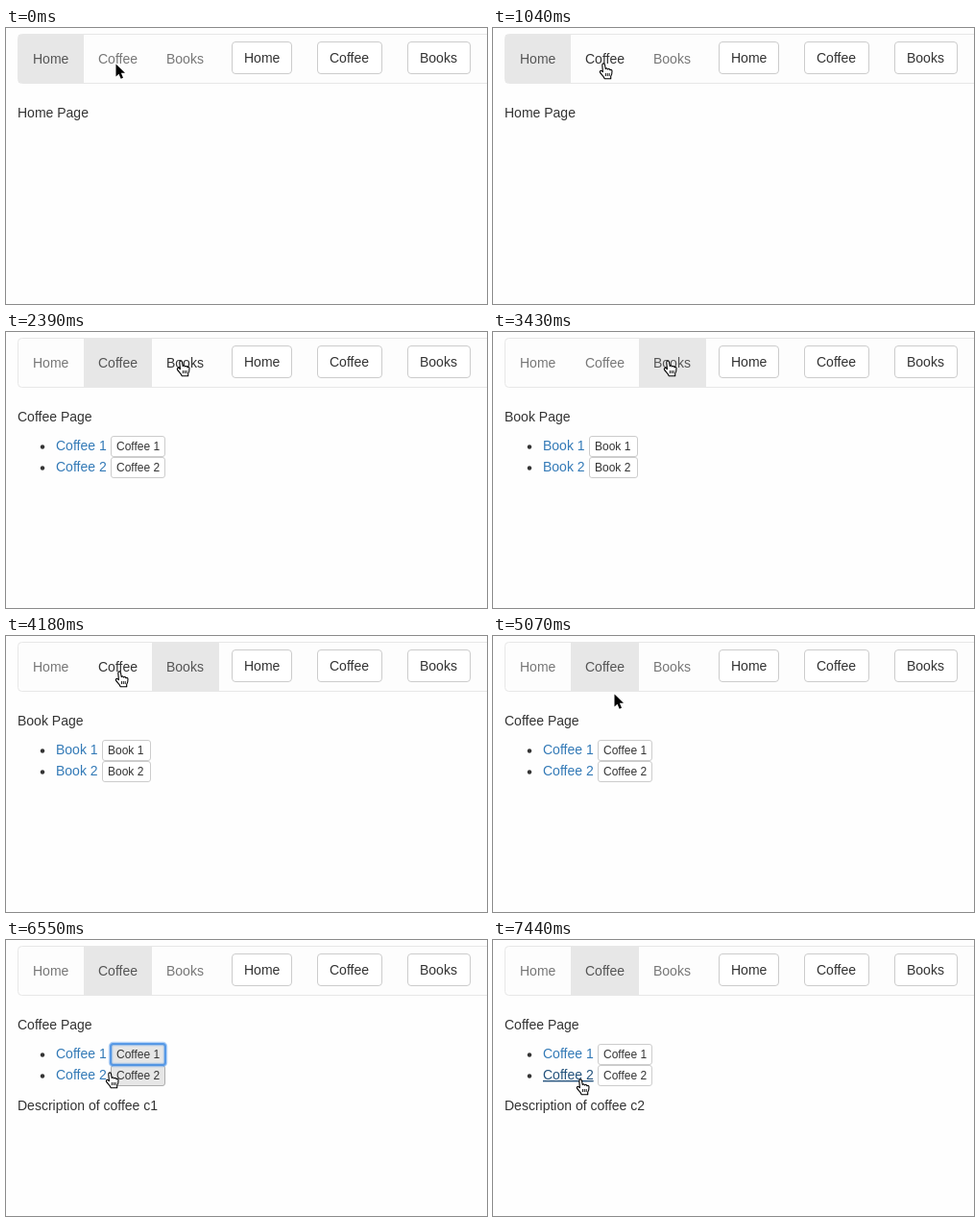
Animation, 501 px wide and 287 px high, one loop 8 s. Source, as an HTML page:

```html
<!DOCTYPE html>
<html lang="en">
<head>
<meta charset="utf-8">
<title>Coffee and books navigation</title>
<style>
  html, body { margin: 0; width: 100%; height: 100%; overflow: hidden; background: #fefefe; }
  svg { display: block; font: 14px "Liberation Sans", Arial, sans-serif; }
  text { white-space: pre; }
</style>
</head>
<body>
<svg id="stage" width="501" height="287" viewBox="0 0 501 287"></svg>
<script>
const LOOP = 8000;
const stage = document.getElementById("stage");

const tabs = [
  { name: "Home", x: 13, width: 68, buttonX: 235, buttonWidth: 63 },
  { name: "Coffee", x: 81, width: 71, buttonX: 324, buttonWidth: 68 },
  { name: "Books", x: 152, width: 70, buttonX: 418, buttonWidth: 66 },
];
const pages = {
  Home: { title: "Home Page" },
  Coffee: { title: "Coffee Page", item: "Coffee", buttonX: 109, buttonWidth: 57 },
  Books: { title: "Book Page", item: "Book", buttonX: 100, buttonWidth: 51 },
};

// Each step overrides part of the state from its time on.
const start = { page: "Home", hover: "", cursor: "arrow", x: 113, y: 36, focus: false, pressed: false, detail: "" };
const steps = [
  [140, { x: 114, y: 34 }],
  [1040, { cursor: "hand", x: 110, y: 36, hover: "Coffee" }],
  [1340, { page: "Coffee" }],
  [2090, { x: 159, y: 30, hover: "Books" }],
  [2240, { x: 172 }],
  [2390, { x: 177, y: 29 }],
  [3430, { page: "Books" }],
  [3880, { x: 146, y: 32 }],
  [4030, { x: 117, y: 36, hover: "Coffee" }],
  [4180, { x: 113 }],
  [4630, { page: "Coffee" }],
  [5070, { cursor: "arrow", x: 125, y: 59, hover: "" }],
  [5220, { cursor: "hand", x: 130, y: 112, hover: "button1" }],
  [5360, { x: 133, y: 127 }],
  [5810, { y: 125 }],
  [5950, { y: 119, focus: true, pressed: true }],
  [6100, { pressed: false, detail: "c1" }],
  [6550, { x: 103, y: 137, hover: "button2" }],
  [6700, { x: 89, y: 143, hover: "link2" }],
  [6850, { x: 87, y: 144 }],
  [7000, { x: 86 }],
  [7290, { focus: false }],
  [7440, { detail: "c2" }],
];

const text = (x, y, content, fill = "#333", extra = "") =>
  `<text x="${x}" y="${y}" fill="${fill}" ${extra}>${content}</text>`;

const box = (x, y, w, h, r, fill, stroke) =>
  `<rect x="${x + .5}" y="${y + .5}" width="${w - 1}" height="${h - 1}" rx="${r}" fill="${fill}" stroke="${stroke}"/>`;

const ring = (x, y, w, h, width, opacity) =>
  `<rect x="${x}" y="${y}" width="${w}" height="${h}" rx="2.5" fill="none" stroke="#4b93e8" stroke-width="${width}" opacity="${opacity}"/>`;

function drawNav({ page, hover }) {
  return box(12, 6, 500, 52, 4, "#fdfdfd", "#e7e7e7") + tabs.map(tab => {
    const selected = tab.name === page;
    const color = selected ? "#555" : tab.name === hover ? "#333" : "#777";
    return (selected ? `<rect x="${tab.x}" y="7" width="${tab.width}" height="50" fill="#e7e7e7"/>` : "")
      + text(tab.x + 15, 37, tab.name, color)
      + box(tab.buttonX, 14, tab.buttonWidth, 34, 3.5, "#fff", "#ccc")
      + text(tab.buttonX + 13, 36, tab.name);
  }).join("");
}

function drawItem(page, number, { hover, focus, pressed }) {
  const { item, buttonX, buttonWidth } = page;
  const y = 86 + 22 * number;
  const label = `${item} ${number}`;
  const focused = focus && number === 1;
  const lit = focused || hover === "button" + number;
  const fill = focused && pressed ? "#d4d4d4" : lit ? "#e6e6e6" : "#fff";
  const linked = hover === "link" + number;
  return `<circle cx="38" cy="${y + 11.5}" r="2.2" fill="#333"/>`
    + text(52, y + 15, label, linked ? "#23527c" : "#337ab7", linked ? 'text-decoration="underline"' : "")
    + box(buttonX, y, buttonWidth, 22, 2.5, fill, lit ? "#adadad" : "#ccc")
    + (focused ? ring(buttonX, y, buttonWidth, 22, 4.5, .4) + ring(buttonX, y, buttonWidth, 22, 2, .85) : "")
    + text(buttonX + 6, y + 15, label, "#333", 'font-size="12"');
}

function drawCursor({ cursor, x, y }) {
  const arrow = `<path d="M1.5 1.5V14.5L4.5 11.7L6.7 16.7L9 15.7L6.9 10.8H11Z"
    fill="#000" stroke="#fff" stroke-width="2" paint-order="stroke"/>`;
  const hand = `<path d="M4.4 9.6L3.8 2.6C3.7 .5 6.2 .3 6.5 2.3L7.2 6.5C7.8 5.5 9.4 5.8 9.5 7C10.3 6.1 11.6 6.5 11.8 7.7
    C12.8 7 14 7.6 14 8.8C14.1 11.5 13.5 13 12.7 14.2V16.8H6.2C5.9 14.6 3.2 12.6 1.6 10.4C.7 8.9 2.3 7.8 3.4 8.8Z"
    fill="#fff" stroke="#000" stroke-width="1.1" stroke-linejoin="round"/>
    <path d="M7.4 11V14M9.3 11V14M11.2 11V14" stroke="#000" stroke-width=".9"/>`;
  return `<g transform="translate(${x} ${y})">${cursor === "arrow" ? arrow : hand}</g>`;
}

function draw(state) {
  const page = pages[state.page];
  stage.innerHTML = drawNav(state)
    + text(12, 93, page.title)
    + (page.item ? drawItem(page, 2, state) + drawItem(page, 1, state) : "")
    + (state.detail ? text(12, 177, `Description of coffee ${state.detail}`) : "")
    + drawCursor(state);
}

let shown = -1;
function tick() {
  const time = performance.now() % LOOP;
  const passed = steps.filter(([at]) => at <= time);
  if (passed.length !== shown) {
    shown = passed.length;
    draw(Object.assign({}, start, ...passed.map(([, change]) => change)));
  }
  requestAnimationFrame(tick);
}
tick();
</script>
</body>
</html>
```
